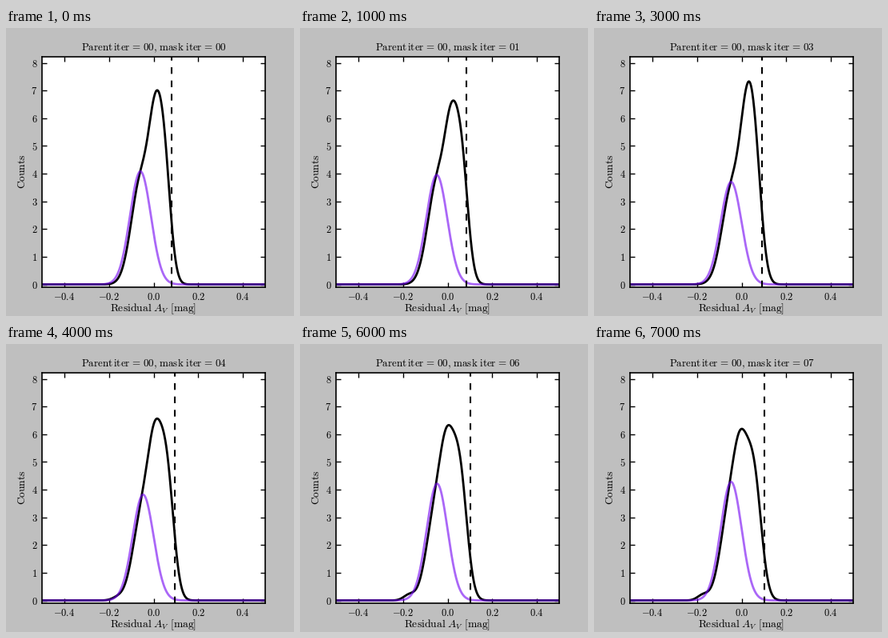
A matplotlib script that plays this animation: 360 by 360 pixels, repeating every 8 s.

```python
import numpy as np
import matplotlib.pyplot as plt
from matplotlib.animation import FuncAnimation

SIZE, DPI = 360, 100
FRAMES, INTERVAL = 8, 1000
VIOLET = (0.447, 0.008, 0.951)

plt.rcParams["mathtext.fontset"] = "cm"

fig = plt.figure(figsize=(SIZE / DPI, SIZE / DPI), dpi=DPI, facecolor="0.75")
ax = fig.add_axes([0.125, 0.1, 0.775, 0.8])
ax.set(xlim=(-0.5, 0.5), ylim=(-0.1, 8.22))

xticks = [-0.4, -0.2, 0.0, 0.2, 0.4]
ax.set_xticks(xticks, [f"${v:.1f}$" for v in xticks])
ax.set_yticks(range(9), [f"${v}$" for v in range(9)])
ax.tick_params(direction="in", length=4, width=1, labelsize=9,
               top=True, right=True, pad=4)
ax.tick_params(axis="x", pad=4.5)
for spine in ax.spines.values():
    spine.set_linewidth(1.2)


def label(x, y, text, px, **kw):
    """Text placed in pixels from the top left."""
    return fig.text(x / SIZE, 1 - y / SIZE, text, fontsize=px * 72 / DPI,
                    ha="center", **kw)


title = label(185, 28, "", 13, va="baseline")
label(184.5, 354, r"$\mathrm{Residual}\ A_V\ \mathrm{[mag]}$", 13.6, va="baseline")
label(20, 179, r"$\mathrm{Counts}$", 13.4, va="center", rotation=90)

x = np.linspace(-0.5, 0.5, 1000)
density, = ax.plot([], [], color="k", lw=2)
noise, = ax.plot([], [], color=VIOLET, alpha=0.6, lw=2)
cutoff, = ax.plot([], [], color="k", lw=1.5)
cutoff.set_linestyle((0, (4, 4)))


def gauss(centre, width, height):
    return height * np.exp(-0.5 * ((x - centre) / width) ** 2)


def area(y):
    return y.sum() * (x[1] - x[0])


def track(n, keys):
    return np.interp(n, list(keys), list(keys.values()))


def noise_fit(n):
    """Centre and height of the noise peak."""
    return (-0.047 - 0.012 * np.exp(-2 * n),
            track(n, {0: 4.08, 3: 3.7, 4: 3.82, 5: 4.15, 7: 4.28}))


def density_curve(n):
    """Noise, a small left tail and two signal lobes, with unit total area."""
    centre, height = noise_fit(n)
    late = 1 / (1 + np.exp(-3 * (n - 4)))
    base = gauss(centre + 0.002 - 0.012 * late, 0.043 - 0.003 * late,
                 height * (0.92 - 0.22 * late))
    base += gauss(-0.15 - 0.022 * late, 0.025, 0.2 * late)
    mid = track(n, {0: 0.026, 1: 0.039, 3: 0.039, 5: 0.027})
    gap = track(n, {0: 0.042, 1: 0.047, 3: 0.039, 4: 0.053, 7: 0.059})
    width = 0.029 + 0.00055 * n
    lobes = gauss(mid - gap / 2, width, 1) + gauss(mid + gap / 2, width, 1)
    return base + lobes * (1 - area(base)) / area(lobes)


def title_text(n):
    def part(word, gap, count):
        return (rf"\mathrm{{{word}}}\hspace{{{gap}}}\mathrm{{iter}}"
                rf"\hspace{{0.12}}=\hspace{{0.12}}{count:02d}")
    return "$" + part("Parent", 0.17, 0) + r",\hspace{0.12}" + part("mask", 0.32, n) + "$"


def update(n):
    centre, height = noise_fit(n)
    noise.set_data(x, gauss(centre, 0.047, height))
    density.set_data(x, density_curve(n))
    cut = 0.081 + 0.021 * np.sin(np.pi * n / 14) ** 1.3
    cutoff.set_data([cut, cut], ax.get_ylim())
    title.set_text(title_text(n))
    return density, noise, cutoff, title


anim = FuncAnimation(fig, update, frames=FRAMES, interval=INTERVAL,
                     init_func=lambda: update(0), repeat=True, repeat_delay=0)
plt.show()
```
